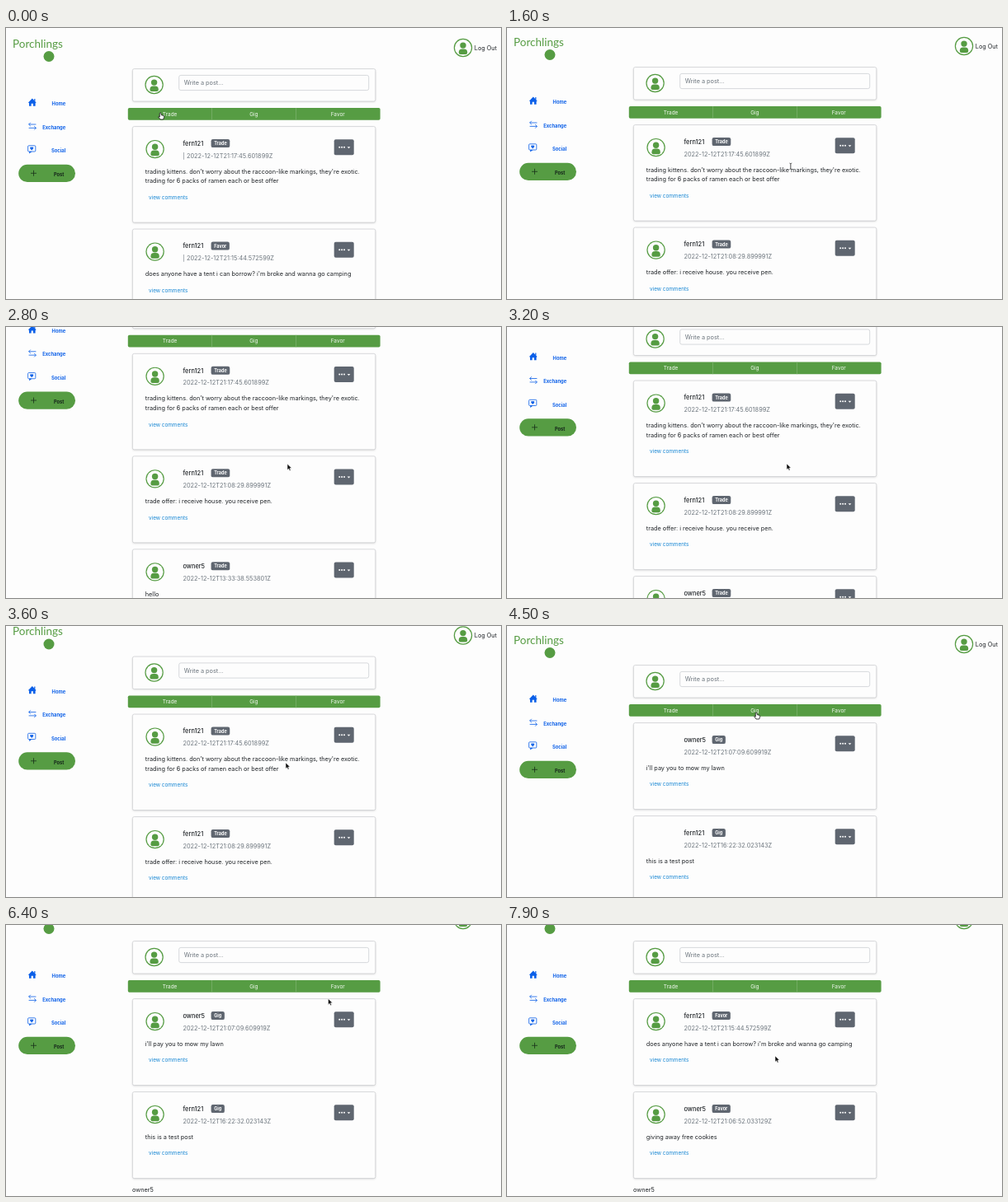
An HTML page with a canvas that plays this animation: 600x329 px, repeating every 8 s.

```html
<!DOCTYPE html>
<html lang="en">
<head>
<meta charset="utf-8">
<title>Neighbourhood posts</title>
<style>
html, body { margin: 0; width: 100%; height: 100%; overflow: hidden; background: #fdfdfd; }
canvas { display: block; width: 600px; height: 329px; }
</style>
</head>
<body>
<canvas id="stage"></canvas>
<script>
const W = 600, H = 329, LOOP = 8000, STEP = 100;
const GREEN = '#569c43', BLUE = '#0b5fe8', LINK = '#1787d4';
const INK = '#212529', GRAY = '#6c757d', SLATE = '#5f6670', PAGE = '#fdfdfd';
const canvas = document.getElementById('stage');
const ctx = canvas.getContext('2d');
const ratio = Math.max(1, window.devicePixelRatio || 1);
canvas.width = W * ratio;
canvas.height = H * ratio;

const A = 'fern121', B = 'owner5';
const kittens = {
  user: A, tag: 'Trade', date: '2022-12-12T21:17:45.601899Z',
  lines: ["trading kittens. don't worry about the raccoon-like markings, they're exotic.",
          'trading for 6 packs of ramen each or best offer']
};
const tent = {
  user: A, tag: 'Favor', date: '2022-12-12T21:15:44.572599Z',
  lines: ["does anyone have a tent i can borrow? i'm broke and wanna go camping"]
};
const feeds = {
  all: [kittens, tent],
  trade: [kittens,
    { user: A, tag: 'Trade', date: '2022-12-12T21:08:29.899991Z', lines: ['trade offer: i receive house. you receive pen.'] },
    { user: B, tag: 'Trade', date: '2022-12-12T13:33:38.553801Z', lines: ['hello'] }],
  gig: [
    { user: B, tag: 'Gig', date: '2022-12-12T21:07:09.609919Z', lines: ["i'll pay you to mow my lawn"] },
    { user: A, tag: 'Gig', date: '2022-12-12T16:22:32.023143Z', lines: ['this is a test post'] }],
  favor: [tent,
    { user: B, tag: 'Favor', date: '2022-12-12T21:06:52.033129Z', lines: ['giving away free cookies'] }]
};
// Each feed appears at its time; its avatars load a little later.
const views = [
  { at: 0, feed: 'all', delay: 0 },
  { at: 800, feed: 'trade', delay: 200 },
  { at: 4400, feed: 'gig', delay: 200 },
  { at: 6700, feed: 'favor', delay: 200 }
];
const scrollKeys = [[0, 0], [1500, 0], [1600, 2], [2100, 111], [2200, 120], [2400, 120],
  [3200, 54.5], [3700, 2], [5100, 2], [5500, 35], [5600, 34.5], [5800, 30], [LOOP, 30]];
const xKeys = [[0, 187], [900, 187], [1500, 344], [2100, 343], [2400, 343], [3200, 339], [3700, 339],
  [4200, 302], [4700, 302], [5200, 333], [5900, 333], [6500, 402], [6900, 402], [7600, 325], [LOOP, 325]];
const yKeys = [[0, 103], [900, 103], [1500, 168], [2100, 167], [3200, 166], [3700, 166],
  [4200, 105], [4700, 105], [5200, 187], [5900, 187], [6500, 70], [6900, 70], [7600, 159], [LOOP, 159]];

function track(keys, t) {
  const i = keys.findIndex(k => k[0] > t);
  if (i < 0) return keys[keys.length - 1][1];
  const [t0, v0] = keys[i - 1], [t1, v1] = keys[i];
  return v0 + (v1 - v0) * (t - t0) / (t1 - t0);
}

function text(str, x, y, size = 7.3, color = INK, weight = 400, align = 'left') {
  ctx.font = `${weight} ${size}px Inter, "Open Sans", sans-serif`;
  ctx.fillStyle = color;
  ctx.textAlign = align;
  ctx.textBaseline = 'alphabetic';
  ctx.fillText(str, x, y + size * 0.36);
}

function box(x, y, w, h, r, fill, stroke, line = 0.7) {
  ctx.beginPath();
  ctx.roundRect(x, y, w, h, r);
  if (fill) { ctx.fillStyle = fill; ctx.fill(); }
  if (stroke) { ctx.strokeStyle = stroke; ctx.lineWidth = line; ctx.stroke(); }
}

function disc(x, y, r, fill) {
  ctx.beginPath();
  ctx.arc(x, y, r, 0, Math.PI * 2);
  ctx.fillStyle = fill;
  ctx.fill();
}

function shape(points, fill, stroke, line = 0.8) {
  ctx.beginPath();
  points.forEach(([x, y], i) => i ? ctx.lineTo(x, y) : ctx.moveTo(x, y));
  if (fill) { ctx.closePath(); ctx.fillStyle = fill; ctx.fill(); }
  if (stroke) { ctx.strokeStyle = stroke; ctx.lineWidth = line; ctx.stroke(); }
}

function at(x, y, draw) {
  ctx.save();
  ctx.translate(x, y);
  draw();
  ctx.restore();
}

function avatar(x, y) {
  at(x, y, () => {
    disc(0, 0, 11.2, GREEN);
    disc(0, 0, 10, PAGE);
    disc(0, -2.9, 3.7, GREEN);
    box(-5.2, 1.5, 10.4, 6.6, [4, 4, 2, 2], GREEN);
  });
}

function panel(y, h) {
  ctx.save();
  ctx.shadowColor = 'rgba(0,0,0,.16)';
  ctx.shadowBlur = 2.5 * ratio;
  ctx.shadowOffsetY = 0.8 * ratio;
  box(153.4, y, 294.4, h, 2, PAGE);
  ctx.restore();
  box(153.4, y, 294.4, h, 2, null, '#cbccce');
}

function card(post, y, loaded, prefix) {
  const extra = (post.lines.length - 1) * 11.5;
  panel(y, 105 + extra);
  if (loaded) avatar(180.6, y + 27.5);
  text(post.user, 214.5, y + 20.5, 7.4, INK, 500);
  ctx.font = '700 5.5px Inter, "Open Sans", sans-serif';
  box(248.6, y + 15.5, ctx.measureText(post.tag).width + 7.2, 10, 2.2, SLATE);
  text(post.tag, 252.2, y + 20.5, 5.5, '#fff', 700);
  text(prefix + post.date, 214.5, y + 35.5, 7.35, GRAY);
  box(397.7, y + 15.6, 24, 19, 2, SLATE);
  for (let i = 0; i < 3; i++) disc(404.2 + i * 2.9, y + 25.2, 1, '#fff');
  shape([[413.6, y + 24.6], [417.4, y + 24.6], [415.5, y + 26.6]], '#fff');
  post.lines.forEach((s, i) => text(s, 168.8, y + 54.5 + i * 11.5));
  text('view comments', 173, y + 74.5 + extra + 11.5 * 0, 6.4, LINK);
  return y + 113 + extra;
}

function header() {
  disc(52, 34.5, 6.5, GREEN);
  ctx.font = '400 13.5px Lato, sans-serif';
  ctx.fillStyle = GREEN;
  ctx.textAlign = 'left';
  ctx.fillText('Porchlings', 8, 23.5);
  avatar(554, 24);
  text('Log Out', 567.8, 24.3, 7.25);
}

function sidebar() {
  // house
  shape([[27, 90.6], [31.8, 85.6], [36.6, 90.6], [35.6, 91.2], [35.6, 94.8], [33, 94.8],
    [33, 91.8], [30.6, 91.8], [30.6, 94.8], [28, 94.8], [28, 91.2]], BLUE);
  shape([[34.2, 86], [35.4, 86], [35.4, 89], [34.2, 89]], BLUE);
  // arrows
  shape([[36.4, 117], [27.6, 117]], null, BLUE);
  shape([[29.8, 114.8], [27.6, 117], [29.8, 119.2]], null, BLUE);
  shape([[27.6, 121.4], [36.4, 121.4]], null, BLUE);
  shape([[34.2, 119.2], [36.4, 121.4], [34.2, 123.6]], null, BLUE);
  // speech bubble
  box(26.6, 142.8, 9.2, 7.2, 1, null, BLUE, 0.8);
  shape([[28.2, 150], [31.4, 150], [28.2, 152.6]], BLUE);
  disc(30.3, 145.7, 1.15, BLUE);
  disc(32.1, 145.7, 1.15, BLUE);
  shape([[29.3, 146.2], [33.1, 146.2], [31.2, 148.5]], BLUE);

  text('Home', 72.2, 92, 5.8, BLUE, 700, 'right');
  text('Exchange', 72.2, 120.5, 5.8, BLUE, 700, 'right');
  text('Social', 72.2, 149.2, 5.8, BLUE, 700, 'right');

  box(15.2, 165.8, 68.8, 21.2, 10.6, GREEN);
  shape([[30, 176.3], [37, 176.3]], null, '#18301a');
  shape([[33.5, 172.8], [33.5, 179.8]], null, '#18301a');
  text('Post', 70.3, 178, 5.7, '#14241a', 700, 'right');
}

function composer() {
  panel(49.6, 39.4);
  avatar(179.6, 69);
  box(209.7, 57.4, 230, 18.2, 2.2, PAGE, '#c6cacf');
  text('Write a post...', 215.8, 66.6, 7.3, GRAY);
  box(147.8, 97, 305.8, 14.8, 1.8, GREEN);
  ['Trade', 'Gig', 'Favor'].forEach((s, i) => {
    text(s, 198.6 + i * 101.8, 104.3, 6.45, '#f4f9f2', 400, 'center');
    if (i) {
      ctx.fillStyle = '#86b878';
      ctx.fillRect(147.4 + i * 101.9, 97, 0.6, 14.8);
    }
  });
}

function arrow() {
  shape([[0, 0], [0, 7.2], [1.7, 5.7], [2.8, 8.2], [4.1, 7.6], [3, 5.2], [5.2, 5]],
    '#111', '#fff', 0.5);
}

function hand() {
  ctx.beginPath();
  ctx.moveTo(-0.8, 0.6);
  ctx.quadraticCurveTo(0.2, -0.8, 1, 0.6);
  ctx.lineTo(1.2, 2.7);
  ctx.lineTo(4, 3.3);
  ctx.quadraticCurveTo(5, 3.8, 4.6, 5.4);
  ctx.lineTo(3.7, 8);
  ctx.lineTo(0, 8);
  ctx.lineTo(-2.4, 4.8);
  ctx.quadraticCurveTo(-2, 3.8, -0.7, 5);
  ctx.closePath();
  ctx.fillStyle = '#fff';
  ctx.fill();
  ctx.strokeStyle = '#111';
  ctx.lineWidth = 0.8;
  ctx.stroke();
}

function beam() {
  shape([[0, -3.4], [0, 3.4]], null, '#222');
  shape([[-1.5, -3.8], [0, -3.2], [1.5, -3.8]], null, '#222', 0.6);
  shape([[-1.5, 3.8], [0, 3.2], [1.5, 3.8]], null, '#222', 0.6);
}

function pointer(t, scroll) {
  const x = track(xKeys, t), y = track(yKeys, t);
  const onBar = y + scroll > 97 && y + scroll < 112 && x > 148 && x < 454;
  const onText = t >= 1400 && t < 1700;
  at(x, y, onBar ? hand : onText ? beam : arrow);
}

function draw(t) {
  const scroll = track(scrollKeys, t);
  const view = views.filter(v => v.at <= t).pop();
  const loaded = t >= view.at + view.delay;
  ctx.setTransform(ratio, 0, 0, ratio, 0, 0);
  ctx.fillStyle = PAGE;
  ctx.fillRect(0, 0, W, H);
  at(0, -scroll, () => {
    header();
    sidebar();
    composer();
    let y = 119.6;
    for (const post of feeds[view.feed]) y = card(post, y, loaded, view.feed === 'all' ? '| ' : '');
    if (view.feed === 'gig' || view.feed === 'favor') text(B, 153, 351.4);
  });
  pointer(t, scroll);
}

let start;
function tick(now) {
  if (start === undefined) start = now;
  const t = (now - start) % LOOP;
  draw(Math.floor(t / STEP) * STEP);
  requestAnimationFrame(tick);
}
draw(0);
requestAnimationFrame(tick);
</script>
</body>
</html>
```
